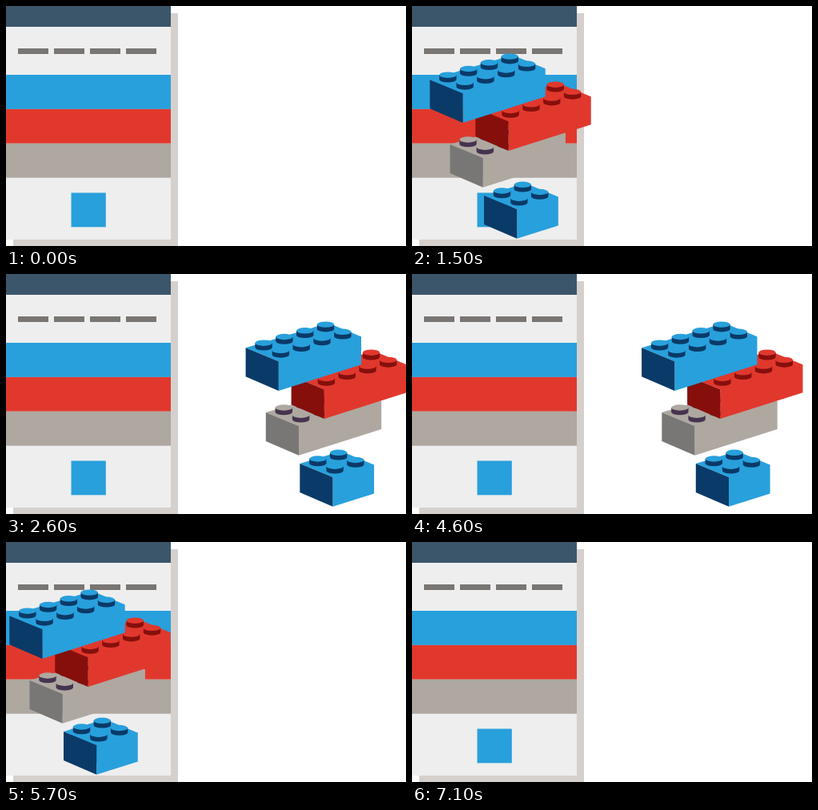
An HTML page that plays this animation: 500 by 300 pixels, repeating every 9.1 s.

```html
<!DOCTYPE html>
<html lang="en">
<head>
<meta charset="utf-8">
<title>Page of bricks</title>
<style>
  html, body { margin: 0; width: 100%; height: 100%; overflow: hidden; background: #fff; }
  svg { display: block; width: 500px; height: 300px; }
</style>
</head>
<body>
<svg viewBox="0 0 500 300">
  <g id="page"></g>
  <g id="bricks"></g>
</svg>
<script>
const LOOP = 9100, STEP = 100, TRAVEL = 295.3;
const BLUE = '#28a0dc', RED = '#e1382d', GREY = '#aea8a1';
const NAVY = '#0a3a68', MAROON = '#860f0c', DARK_GREY = '#797776';

const page = document.getElementById('page');
const bricks = document.getElementById('bricks');

function add(parent, tag, attrs) {
  const node = document.createElementNS('http://www.w3.org/2000/svg', tag);
  for (const key in attrs) node.setAttribute(key, attrs[key]);
  parent.appendChild(node);
  return node;
}

const rect = (x, y, width, height, fill) => add(page, 'rect', { x, y, width, height, fill });
const polygon = (fill, ...points) => add(bricks, 'polygon', { points: points.join(' '), fill });

function drawPage() {
  rect(9, 9, 206, 292, '#d5d0cc');
  rect(0, 0, 206, 292, '#eeeeee');
  rect(0, 0, 206, 26, '#3b566b');
  for (let i = 0; i < 4; i++) rect(15 + 45 * i, 53, 38, 7, '#787573');
  [BLUE, RED, GREY].forEach((fill, i) => rect(0, 86 + 42.9 * i, 206, 42.9, fill));
  rect(81.5, 233.5, 43.3, 42.8, BLUE);
}

function drawStud(x, y, top, side) {
  const rx = 10.7, ry = 3.7, height = 5.6;
  add(bricks, 'path', {
    d: `M${x - rx} ${y}v${height}a${rx} ${ry} 0 0 0 ${2 * rx} 0v${-height}z`,
    fill: side
  });
  add(bricks, 'ellipse', { cx: x, cy: y, rx, ry, fill: top });
}

// (x, y) is the upper left corner; length counts studs along the long side
function drawBrick(x, y, length, light, dark, studSide = dark) {
  const dx = 25.8 * length, dy = -7.75 * length;
  const left = [x, y], front = [x + 41.2, y + 17];
  const right = [front[0] + dx, front[1] + dy], back = [x + dx, y + dy];
  const down = ([px, py], h) => [px, py + h];

  polygon(light, left, back, right, down(right, 36.8 - length * 0.45), down(front, 36.8), front);
  polygon(dark, left, front, down(front, 36.8), down(left, 36));
  for (let i = length - 1; i >= 0; i--) {
    const sx = x + 22.5 + 25.8 * i, sy = y - 6 - 7.7 * i;
    drawStud(sx, sy, light, studSide);
    drawStud(sx + 21.3, sy + 9.2, light, studSide);
  }
}

const clamp = v => Math.min(1, Math.max(0, v));

function ease(p) {
  p = clamp(p);
  return p - 0.28 * Math.sin(2 * Math.PI * p) / (2 * Math.PI);
}

// Twelve steps of travel; lag delays the motion slightly before it settles
function travel(tick, start, lag) {
  const step = tick - start;
  return step >= 12 ? 1 : ease((step - lag) / 12);
}

function render(time) {
  const tick = Math.floor((time % LOOP) / STEP);
  const x = TRAVEL * (travel(tick, 14, 0) - travel(tick, 45, 0.3));
  const opacity = clamp(tick / 5) - clamp((tick - 66) / 5);
  bricks.setAttribute('transform', `translate(${x.toFixed(2)} 0)`);
  bricks.setAttribute('opacity', opacity.toFixed(2));
}

drawPage();
drawBrick(72, 237, 2, BLUE, NAVY);
drawBrick(29.5, 173, 4, GREY, DARK_GREY, '#453450');
drawBrick(61.3, 127.3, 4, RED, MAROON);
drawBrick(4.3, 92.2, 4, BLUE, NAVY);

const begin = performance.now();
function frame() {
  render(performance.now() - begin);
  requestAnimationFrame(frame);
}
frame();
</script>
</body>
</html>
```
